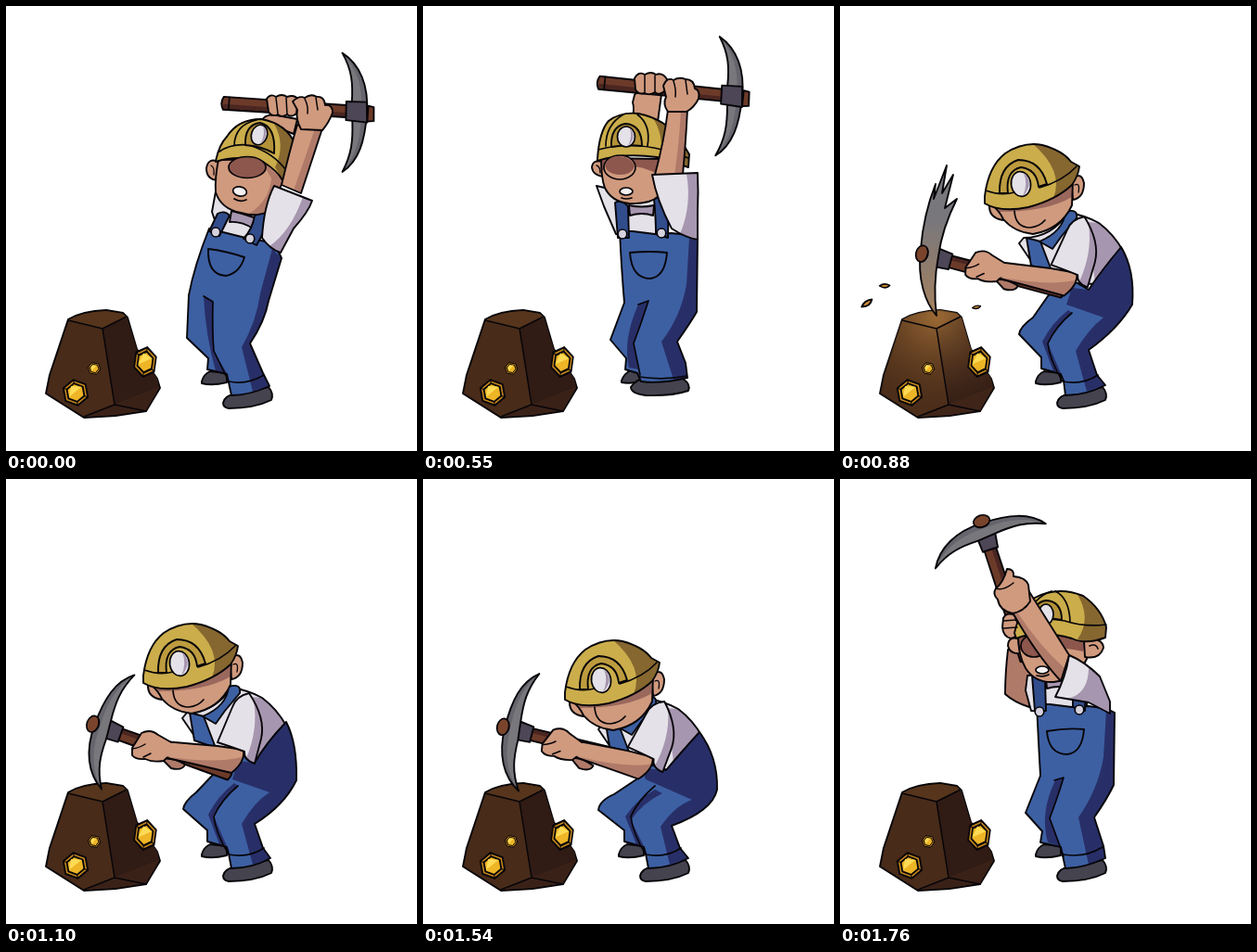
An HTML page for the animation above (1870 ms loop, 443 by 480 pixels).

```html
<!DOCTYPE html>
<html lang="en">
<head>
<meta charset="utf-8">
<title>Miner</title>
<style>
html, body { margin: 0; width: 100%; height: 100%; overflow: hidden; background: #fff; }
svg { display: block; width: 443px; height: 480px; }
</style>
</head>
<body>
<svg viewBox="0 0 443 480" stroke-linejoin="round" stroke-linecap="round">
  <defs>
    <radialGradient id="glow" gradientUnits="userSpaceOnUse" cx="104" cy="335" r="95">
      <stop offset="0" stop-color="#c98c45" stop-opacity=".6"/>
      <stop offset="1" stop-color="#6b4520" stop-opacity=".1"/>
    </radialGradient>
    <linearGradient id="heat" x1="0" y1="0" x2="0" y2="1">
      <stop offset=".35" stop-color="#78777c"/>
      <stop offset="1" stop-color="#a5815f"/>
    </linearGradient>
  </defs>
  <g id="stage"></g>
</svg>
<script>
const INK = '#070509', SKIN = '#d09a7e', SKIN_DARK = '#8d574d', SKIN_MID = '#b07a69',
  HAT = '#cbad4b', HAT_DARK = '#86672f', BLUE = '#3d60a3', NAVY = '#282f68', STRAP = '#324d8c',
  WHITE = '#e4e2e8', LILAC = '#a796b0', BOOT = '#45434e',
  STEEL = '#78777c', STEEL_DARK = '#4c4656', WOOD = '#6c3a29';
const LOOP = 1870;

const fill = (d, c) => `<path d="${d}" fill="${c}"/>`;
const line = (d, w = 1.7) => `<path d="${d}" fill="none" stroke="${INK}" stroke-width="${w}"/>`;
const part = (d, c, shade = '', dark = '') => fill(d, c) + (shade && fill(shade, dark)) + line(d, 1.9);
const oval = (x, y, rx, ry, c, a = 0) =>
  `<ellipse cx="${x}" cy="${y}" rx="${rx}" ry="${ry}" fill="${c}" stroke="${INK}" stroke-width="1.7" transform="rotate(${a} ${x} ${y})"/>`;
const group = (t, s) => `<g transform="${t}">${s}</g>`;

// Blend two poses whose paths share the same commands
const NUM = /-?\d+(\.\d+)?/g;
function mixText(a, b, k) {
  const to = b.match(NUM);
  let i = 0;
  return a.replace(NUM, n => +(n * (1 - k) + to[i++] * k).toFixed(2));
}
const mix = (a, b, k) => Object.fromEntries(Object.keys(a).map(key => [key, mixText(a[key], b[key], k)]));

const heads = {
  tilted: () =>
    part('M229,168 Q218,163 216,175 Q216,187 228,188Z', SKIN) + line('M221,172 Q225,174 224,182', 1.3) +
    part('M229,166 Q225,185 226,201 Q232,219 253,223 Q270,228 281,222 Q292,205 299,188 L290,165Z', SKIN,
      'M275,166 L299,188 Q292,205 281,222 Q272,226 262,224 Q284,210 286,186Z', SKIN_MID) +
    part('M226,167 Q230,149 238,141 Q250,122 275,122 Q303,127 312,150 Q314,163 310,173 L298,188 Q293,178 277,168 Q250,160 226,168Z', HAT,
      'M289,127 Q307,135 312,150 Q314,163 310,173 L298,188 L290,174 Q302,150 289,127Z', HAT_DARK) +
    line('M230,157 Q243,148 262,150 Q290,159 303,179 M246,150 Q247,128 270,123') +
    part('M258,150 Q257,128 274,126 Q291,130 289,159 Q275,151 258,150Z', '#b39238') +
    oval(273, 139, 8.5, 11, WHITE, 20) + fill('M277,129 Q285,138 274,149 Q280,139 277,129Z', LILAC) +
    oval(260, 174, 20, 11.5, SKIN_DARK) +
    oval(252, 200, 7.5, 5, '#f4f1f2', 12) + line('M246,208 Q252,212 259,209'),
  level: () =>
    part('M194,168 Q183,165 182,174 Q183,183 195,184Z', SKIN) + line('M187,172 Q191,173 191,180', 1.3) +
    part('M192,164 Q192,186 196,196 Q203,211 222,213 Q245,214 254,205 L258,165Z', SKIN,
      'M192,165 L258,165 L254,182 Q226,166 193,177Z', SKIN_DARK) +
    part('M188,165 Q190,135 200,124 Q213,114 232,116 Q262,122 278,145 L287,160 L286,174 Q270,168 252,163 Q215,158 188,167Z', HAT,
      'M248,121 Q266,130 278,145 L287,160 L286,174 L256,164 Q260,140 248,121Z', HAT_DARK) +
    line('M189,155 Q222,146 258,155 Q272,158 286,164 M197,151 Q197,128 216,117 M242,151 Q246,128 231,117') +
    part('M203,152 Q202,130 218,127 Q236,128 236,151 Q220,149 203,152Z', '#b39238') +
    oval(219, 141, 9.5, 11, WHITE) + fill('M223,132 Q231,141 221,151 Q226,141 223,132Z', LILAC) +
    oval(212, 174, 17, 13, SKIN) + fill('M196,172 Q200,161 212,162 Q225,163 228,173 Q225,182 212,182 Q198,181 196,172Z', SKIN_DARK) +
    oval(219, 200, 7, 4, '#f4f1f2') + line('M214,207 Q219,209 225,207'),
  raised: () =>
    part('M192,172 Q181,170 181,180 Q183,189 194,188Z', SKIN) +
    part('M192,168 Q192,190 200,204 Q210,220 230,219 Q256,216 266,194 L266,168Z', SKIN,
      'M192,168 L266,168 L262,186 Q225,178 193,184Z', SKIN_DARK) +
    part('M263,174 Q283,170 284,182 Q280,195 264,192Z', SKIN) + line('M269,180 Q276,177 278,183') +
    oval(209, 180, 14, 12, SKIN_DARK) +
    part('M188,166 Q195,136 210,128 Q235,115 262,126 Q282,140 287,160 L286,171 Q265,179 250,172 Q215,162 190,172Z', HAT,
      'M255,123 Q282,137 287,160 L286,171 Q268,178 256,173 Q272,150 255,123Z', HAT_DARK) +
    line('M196,156 Q220,148 242,153 Q264,160 287,157 M204,150 Q206,129 228,121 M248,154 Q247,128 232,121') +
    part('M209,151 Q208,133 222,131 Q239,132 239,152 Q224,149 209,151Z', '#b39238') +
    oval(222, 146, 8, 11, WHITE) +
    oval(218, 206, 7, 4, '#f4f1f2') + line('M212,212 Q219,214 225,211'),
  bent: () =>
    part('M153,221 Q152,236 168,238 L170,222Z', SKIN) +
    part('M241,195 Q252,184 255,198 Q255,214 243,216Z', SKIN) + line('M245,200 Q251,197 249,208', 1.3) +
    part('M156,222 Q164,228 168,237 Q180,251 200,253 Q230,248 242,222 L243,195 Q210,220 156,222Z', SKIN,
      'M160,223 Q205,225 243,198 L242,213 Q215,229 164,229Z', '#9b685d') +
    line('M180,228 Q181,246 197,246 Q207,245 213,238') +
    part('M148,212 Q152,180 170,166 Q190,153 210,157 Q232,163 241,175 L250,180 Q249,190 242,200 Q225,216 195,224 Q165,230 148,220Z', HAT,
      'M199,155 Q232,161 241,175 L250,180 Q249,190 242,200 Q232,208 222,214 Q234,185 199,155Z', HAT_DARK) +
    line('M149,206 Q165,212 180,208 M207,203 Q232,196 247,180') +
    part('M164,209 Q163,180 184,173 Q208,173 215,199 L206,202 Q204,183 187,181 Q170,185 173,209Z', '#bd9b3e') +
    oval(187, 199, 10.5, 13.5, WHITE, -8) + fill('M190,187 Q202,198 189,212 Q195,199 190,187Z', LILAC)
};

const back = {
  head: 'tilted', headAt: 'translate(0 0) rotate(0 260 174)', pick: '380 115 4',
  farArm: 'M276,124 Q278,116 292,118 L314,122 L310,138 L300,134 Q288,126 276,128Z',
  farHand: 'M281,100 Q285,94 291,98 Q297,94 303,98 Q311,95 315,101 L313,116 Q307,121 303,117 Q297,121 293,117 Q286,120 283,114Z',
  hand: 'M309,103 Q316,96 322,99 Q329,94 335,98 Q343,97 344,107 Q352,106 352,115 Q348,126 341,134 L318,133 Q312,122 314,112Z',
  fingers: 'M291,99 L293,116 M302,99 L303,117 M322,100 Q326,108 325,116 M334,99 L336,112',
  arm: 'M314,128 Q306,155 297,193 L318,202 Q330,165 341,132Z',
  armDark: 'M333,132 Q322,165 310,199 L318,202 Q330,165 341,132Z',
  sleeve: 'M289,194 L330,210 Q326,222 310,240 L296,266 Q284,262 276,250 Q278,215 289,194Z',
  sleeveDark: 'M320,206 L330,210 Q326,222 310,240 L296,266 L284,259 Q307,243 320,206Z',
  shirt: 'M226,200 L222,222 L230,246 L285,258 L286,222 L262,214Z',
  collar: 'M243,221 Q256,224 270,229 L266,240 Q254,232 241,233Z',
  pants: 'M219,240 Q203,280 197,312 L195,358 L218,380 L217,392 L238,397 L243,420 Q262,420 284,410 L277,396 L263,364 Q279,340 283,318 L297,272 Q290,256 280,254 L258,250 L234,244Z',
  pantsDark: 'M287,262 L297,272 L283,318 Q279,340 263,364 L277,396 L284,410 L266,416 L254,368 Q270,340 274,310Z M213,313 L223,319 L224,372 L238,396 L226,394 Q215,355 213,313Z',
  seams: 'M213,313 L223,319 Q222,350 224,372 L240,405 M240,405 Q260,409 278,398',
  strapL: 'M228,224 Q236,220 241,226 L230,248 L219,243Z',
  strapR: 'M268,226 Q280,220 281,228 Q281,240 270,258 L256,251 Q266,240 268,226Z',
  buttons: '226 244 263 251',
  pocket: 'M218,262 Q217,290 237,291 Q252,288 257,271 Q236,264 218,262Z',
  boot: 'M234,428 Q236,420 246,419 L283,411 Q289,418 286,425 Q268,434 240,434 Q234,433 234,428Z',
  farBoot: 'M211,405 Q213,397 220,394 L238,396 L238,406 Q222,410 211,407Z'
};
const far = {
  head: 'tilted', headAt: 'translate(9 -11) rotate(4 260 174)', pick: '410 131 21',
  farArm: 'M314,102 Q318,96 326,102 L344,114 L332,128 L324,150 Q310,140 305,126Z',
  farHand: 'M318,88 Q322,80 330,84 Q337,82 342,89 Q349,88 352,95 L345,110 Q338,113 336,108 Q329,110 327,105 Q319,106 318,98Z',
  hand: 'M350,98 Q356,92 361,96 Q368,95 371,102 Q379,102 380,112 Q384,117 378,126 Q372,135 365,139 L343,128 Q340,120 345,112Z',
  fingers: 'M329,85 L327,104 M341,90 L336,107 M361,97 Q360,106 355,114 M371,103 L365,118',
  arm: 'M342,126 Q328,158 317,185 L333,198 Q350,165 365,137Z',
  armDark: 'M357,134 Q342,165 327,193 L333,198 Q350,165 365,137Z',
  sleeve: 'M314,183 L339,218 Q330,230 312,250 L302,262 Q290,255 280,244 Q295,215 314,183Z',
  sleeveDark: 'M333,209 L339,218 Q330,230 312,250 L302,262 L288,252 Q317,238 333,209Z',
  shirt: 'M243,198 L240,212 L240,236 L285,248 L300,222 L270,205Z',
  collar: 'M247,210 Q260,210 272,214 L268,226 Q256,221 246,222Z',
  pants: 'M226,240 Q212,280 205,310 L202,350 L221,381 L221,393 L232,395 L239,405 Q258,407 279,400 L282,386 L274,352 Q282,330 285,310 L303,263 Q298,256 286,248 L266,244 L240,236Z',
  pantsDark: 'M295,256 L303,263 L285,310 Q282,330 274,352 L282,386 L279,400 L270,403 L266,355 Q276,330 281,300Z M219,310 L230,314 L230,372 L234,395 L230,392 Q224,355 219,310Z',
  seams: 'M219,310 L230,314 Q227,340 230,372 L239,403 M239,402 Q260,405 280,399',
  strapL: 'M236,207 Q243,204 248,212 L240,238 L228,233Z',
  strapR: 'M280,214 Q292,210 292,218 Q288,232 278,248 L264,241 Q272,230 280,214Z',
  buttons: '233 230 269 240',
  pocket: 'M221,259 Q216,285 237,287 Q250,285 260,267 Q240,260 221,259Z',
  boot: 'M232,413 Q236,406 246,404 L278,402 Q288,410 286,418 Q268,427 245,426 Q232,422 232,413Z',
  farBoot: 'M211,405 Q215,397 222,393 L237,396 L239,406 Q222,409 211,407Z'
};
const ready = {
  head: 'level', headAt: 'translate(0 0)', pick: '335 98 6',
  farArm: 'M228,96 Q230,92 240,93 L257,95 L253,125 L226,122 Q228,110 226,104Z',
  farHand: 'M228,78 Q232,70 239,74 Q246,70 251,74 Q258,71 263,79 L260,92 Q255,97 250,93 Q244,97 239,94 Q232,96 229,90Z',
  hand: 'M259,86 Q263,76 270,80 Q276,76 283,79 Q292,79 293,89 Q299,91 297,100 Q292,110 284,114 L264,114 Q258,106 262,98Z',
  fingers: 'M239,75 L239,93 M250,75 L250,93 M270,81 Q273,90 272,98 M283,80 L285,95',
  arm: 'M264,112 Q260,145 250,182 L280,182 Q283,150 285,112Z',
  armDark: 'M278,112 Q276,150 271,182 L280,182 Q283,150 285,112Z',
  sleeve: 'M247,182 L296,180 Q297,200 296,222 L296,252 Q283,250 268,240 Q252,210 247,182Z',
  sleeveDark: 'M284,181 L296,180 Q297,200 296,222 L296,252 L277,246 Q290,215 284,181Z',
  shirt: 'M187,194 L195,216 L208,246 L262,250 L262,212 L235,205Z',
  collar: 'M222,215 Q236,218 249,215 L248,226 Q236,222 223,226Z',
  pants: 'M212,243 Q214,285 217,320 L202,360 L219,380 L218,392 L231,396 L235,405 Q255,408 285,401 L283,385 L274,362 Q288,342 295,330 L296,250 Q288,247 268,245 L250,246 L226,243Z',
  pantsDark: 'M287,250 L296,250 L295,330 Q288,342 274,362 L283,385 L285,401 L270,403 L257,362 Q278,335 284,300Z M232,322 L243,318 L227,364 L232,392 L222,390 Q215,360 232,322Z',
  seams: 'M232,322 L243,318 Q236,340 227,364 L234,398 M233,400 Q260,404 284,399',
  strapL: 'M207,212 Q214,208 221,216 L222,250 L210,250Z',
  strapR: 'M249,208 Q261,204 263,212 Q265,228 264,250 L251,246 Q251,230 249,208Z',
  buttons: '215 246 257 245',
  pocket: 'M223,266 Q225,294 245,294 Q261,292 263,266 Q245,264 223,266Z',
  boot: 'M224,411 Q230,402 240,402 L280,402 Q289,408 286,415 Q268,421 240,420 Q224,418 224,411Z',
  farBoot: 'M214,404 Q217,396 224,393 L236,396 L236,405 Q222,408 214,406Z'
};
const lift = {
  ...ready, head: 'raised', pick: '156 56 252', forward: 'yes',
  farArm: 'M181,184 Q178,210 178,232 Q188,241 204,246 L206,205 L195,185Z',
  farHand: 'M176,150 Q180,143 188,147 L193,160 Q191,172 184,172 Q176,170 175,160Z',
  hand: 'M168,118 Q176,112 180,97 Q188,97 187,105 Q200,106 203,114 L205,132 Q198,143 186,145 Q172,142 170,130 Q164,124 168,118Z',
  fingers: 'M168,118 Q176,121 187,112 M176,153 L190,152 M176,161 L191,160',
  arm: 'M203,120 Q222,150 247,190 L238,218 Q212,190 186,144Z',
  armDark: 'M192,145 Q215,180 242,204 L238,218 Q212,190 186,144Z',
  sleeve: 'M247,190 Q264,197 280,213 L291,240 L291,253 L268,241 L232,235 Q243,215 247,190Z',
  sleeveDark: 'M268,203 Q276,207 280,213 L291,240 L291,253 L268,241 L245,237 Q268,232 268,203Z',
  shirt: 'M202,212 L200,228 L206,250 L266,252 L266,212 L235,210Z',
  pants: 'M212,243 Q214,285 216,320 L200,360 L218,380 L216,392 L238,397 L243,420 Q262,420 286,409 L284,396 L274,365 Q288,345 295,330 L296,252 Q288,247 268,245 L250,246 L226,243Z',
  pantsDark: 'M287,250 L296,252 L295,330 Q288,345 274,365 L284,396 L286,409 L268,416 L257,365 Q278,335 284,300Z M232,325 L241,322 L226,366 L238,396 L224,392 Q215,360 232,325Z',
  seams: 'M231,325 L241,322 Q235,342 226,366 L241,407 M241,405 Q264,409 283,397',
  buttons: '215 251 258 249',
  pocket: 'M223,272 Q225,297 245,297 Q261,295 263,270 Q245,268 223,272Z',
  boot: back.boot, farBoot: back.farBoot
};

const rest = {
  headAt: 'translate(0 0)', torsoAt: 'translate(0 0)', armAt: 'translate(0 0) rotate(0 256 300)', pick: '104 268 200',
  pants: 'M302,262 Q314,285 313,325 Q300,352 268,372 L277,398 L285,409 Q265,420 243,420 L240,404 L238,397 L217,391 L217,379 L191,356 Q192,348 205,338 L224,318 L236,306 L254,298 L268,306 Q280,285 302,262Z',
  dark: 'M302,262 Q314,285 313,325 Q300,352 268,372 L277,398 L285,409 L266,416 L254,372 Q268,348 284,338 L244,324 L250,304 L268,306 Q280,285 302,262Z M246,328 Q228,342 218,362 L230,394 L238,396 L224,364 Q234,345 250,331Z'
};
const strike = {
  headAt: 'translate(8 -7)', torsoAt: 'translate(3 -2)', armAt: 'translate(-1 -4) rotate(2 256 300)', pick: '99 270 195',
  pants: 'M303,260 Q318,285 315,322 Q300,348 268,371 L277,398 L286,409 Q265,420 243,420 L241,404 L238,397 L217,391 L217,379 L193,354 Q194,346 208,336 L224,313 L236,302 L254,298 L268,306 Q282,285 303,260Z',
  dark: 'M303,260 Q318,285 315,322 Q300,348 268,371 L277,398 L286,409 L266,416 L254,372 Q268,348 284,336 L244,322 L250,304 L268,306 Q282,285 303,260Z M246,328 Q228,342 218,362 L230,394 L238,396 L224,364 Q234,345 250,331Z'
};
const slump = {
  headAt: 'translate(5 18)', torsoAt: 'translate(-1 12)', armAt: 'translate(-9 8) rotate(6 256 300)', pick: '97 270 194',
  pants: 'M298,273 Q318,300 317,335 Q312,358 268,374 L277,398 L286,409 Q265,420 243,420 L240,404 L238,397 L217,391 L217,379 L189,357 Q190,347 206,340 L230,324 L236,314 L240,306 L262,314 Q278,295 298,273Z',
  dark: 'M298,273 Q318,300 317,335 Q312,358 268,374 L277,398 L286,409 L266,416 L256,375 Q272,352 290,346 L240,324 L236,312 L262,314 Q278,295 298,273Z M250,335 Q230,346 218,364 L230,394 L238,396 L224,368 Q236,350 258,339Z'
};

const BLADE = 'M-22,-63 C-2,-52 9,-30 9,0 C9,30 4,52 -13,65 C-4,45 -4,30 -6,10 L-8,-10 C-8,-30 -10,-45 -22,-63Z';
const EDGE = 'M-22,-63 C-2,-52 9,-30 9,0 C9,30 4,52 -13,65 C2,45 4,25 3,0 C3,-30 -6,-48 -22,-63Z';
const SMEAR = 'M104,334 C92,320 83,295 87,262 Q90,225 103,192 L101,208 L115,172 L110,202 L122,182 L113,218 L126,208 Q110,240 106,270 Q100,302 104,334Z';

function pick(spec, forward, smear) {
  const [x, y, a] = spec.split(' ');
  const at = `translate(${x} ${y}) rotate(${a})`;
  const handle = part('M-146,-7 L-10,-7 L-10,6 L-146,7 Q-150,0 -146,-7Z', WOOD, 'M-146,1 L-10,1 L-10,6 L-146,7Z', '#4b2621');
  const blade = part(BLADE, STEEL, EDGE, '#66646c');
  if (!forward) return group(at, handle + line('M-140,-7 L-140,7') + blade +
    part('M-14,-11 L8,-12 L10,10 L-13,9Z', STEEL_DARK) + part('M10,-8 L16,-7 L17,8 L10,9Z', WOOD));
  return group(at, handle + part('M-21,-9 L-6,-10 L-6,10 L-21,8Z', STEEL_DARK) + (smear ? '' : blade)) +
    (smear ? part(SMEAR, 'url(#heat)') : '') + group(at, oval(11, 0, 6.5, 9, '#7a442c') + line('M7,-7 Q3,0 7,7', 1.2));
}

function standing(p) {
  const b = p.buttons.split(' ');
  return part(p.farArm, p.forward ? SKIN_MID : SKIN) + pick(p.pick, p.forward) +
    part(p.farHand, SKIN) + part(p.farBoot, BOOT) + part(p.boot, BOOT) +
    part(p.shirt, WHITE) + part(p.collar, LILAC) + part(p.pants, BLUE, p.pantsDark, NAVY) + line(p.seams) +
    part(p.strapL, STRAP) + part(p.strapR, STRAP) +
    oval(b[0], b[1], 4.8, 5, '#d6d2de') + oval(b[2], b[3], 4.8, 5, '#d6d2de') + part(p.pocket, BLUE) +
    group(p.headAt, heads[p.head]()) +
    part(p.arm, SKIN, p.armDark, SKIN_MID) + part(p.sleeve, WHITE, p.sleeveDark, LILAC) +
    part(p.hand, SKIN) + line(p.fingers, 1.5);
}

function crouching(p, smear) {
  const torso =
    part('M243,225 Q262,228 276,236 Q292,248 302,266 L272,302 L235,300 L205,280 L190,258 L195,252 Q225,252 243,225Z', WHITE,
      'M276,236 Q292,248 302,266 L272,302 L264,235Z', LILAC) +
    part('M198,252 L213,256 L226,290 L203,282Z', BLUE) +
    part('M240,224 Q254,220 252,231 L236,250 L226,264 L212,256 Q238,245 240,224Z', BLUE);
  const arm =
    part('M168,302 Q180,300 193,308 Q190,315 178,312Z', SKIN_MID) +
    part('M170,283 L228,288 L256,292 Q258,305 243,317 L205,308 L170,300Z', SKIN,
      'M178,300 Q225,307 254,300 Q252,310 243,317 L205,308Z', SKIN_MID) +
    part('M136,290 Q140,284 146,274 Q156,269 164,276 L178,284 Q180,296 170,304 Q158,306 150,302 Q140,303 136,298Z', SKIN) +
    fill('M168,284 L180,285 L180,299 L168,300Z', SKIN) + line('M136,291 Q144,290 150,286 M148,300 L156,296', 1.5) +
    part('M262,231 Q248,234 244,246 L228,284 Q246,290 257,294 Q256,303 268,307 L275,280 Q280,258 262,231Z', WHITE,
      'M267,240 Q278,260 275,280 L268,307 L259,301 Q272,270 267,240Z', LILAC);
  return part(back.farBoot, BOOT) + part(back.boot, BOOT) + group(p.torsoAt, torso) +
    part(p.pants, BLUE, p.dark, NAVY) + line('M250,331 Q232,346 224,364 Q226,382 240,405 Q262,409 278,398') +
    pick(p.pick, true, smear) + group(p.headAt, heads.bent()) + group(p.armAt, arm);
}

function gem(x, y, s, a) {
  const ring = r => 'M' + [0, 1, 2, 3, 4, 5].map(i =>
    `${(r * Math.cos(i * Math.PI / 3)).toFixed(1)},${(r * Math.sin(i * Math.PI / 3)).toFixed(1)}`).join(' L') + 'Z';
  return group(`translate(${x} ${y}) rotate(${a}) scale(${s})`,
    part(ring(14), '#c98a1c') + part(ring(10), '#eeb526') +
    fill('M-7,-5 L4,-8 L-5,7Z', '#ffdb55') + line('M10,0 L14,0 M-10,0 L-14,0 M5,9 L7,12 M-5,-9 L-7,-12', 1.1));
}

const BODY = 'M67,338 Q82,329 108,328 L126,331 L131,336 L141,370 L163,402 L166,412 L151,437 L118,442 L84,444 L43,418 L47,398Z';
const rock = lit =>
  part(BODY, '#482b19') +
  fill('M67,339 Q82,330 108,329 L126,332 L129,335 L104,348Z', '#56351c') +
  fill('M104,348 L130,335 L141,370 L163,402 L165,411 L117,430Z', '#301b15') +
  fill('M117,430 L165,411 L151,436 L118,441 L85,443Z', '#3a2117') +
  (lit ? fill(BODY, 'url(#glow)') : '') +
  line('M67,339 L104,348 L130,335 M104,348 L117,430 L84,443 M117,430 L151,437', 1.5) +
  gem(75, 417, 1, 20) + gem(95, 391, .48, 10) +
  group('translate(150 384) scale(.9 1.15)', gem(0, 0, 1, 40));

// Chips fly outward from the pick's tip
const chip = (x, y, s, a) => group(`translate(${x} ${y}) rotate(${a}) scale(${s})`,
  part('M-6,2 Q-2,-4 6,-3 Q3,4 -6,2Z', '#c98a35'));
const chips = k => [[29, 321, 1.05, -14], [48, 302, .85, 20], [147, 325, .7, 10]]
  .map(([x, y, s, a]) => chip(104 + (x - 104) * k, 330 + (y - 330) * k + 8 * (k - 1), s, a)).join('');

const settle = k => () => rock() + crouching(mix(rest, slump, k));
const upright = p => () => rock() + standing(p);
const heave = { ...slump, armAt: 'translate(-4 -16) rotate(36 256 300)', headAt: 'translate(6 4)', torsoAt: 'translate(0 5)', pick: '128 176 234' };

const plan = [
  [0, upright(back)],
  [220, upright(mix(back, far, .55))],
  [330, upright(far)],
  [550, upright(ready)],
  [660, upright(lift)],
  [770, () => rock(true) + crouching(strike, true) + chips(.6)],
  [880, () => rock(true) + crouching(strike, true) + chips(1)],
  [990, () => rock() + crouching(mix(strike, rest, .6)) + chips(1.09)],
  [1100, settle(0)],
  [1210, settle(.2)],
  [1320, settle(.45)],
  [1430, settle(.75)],
  [1540, settle(1)],
  [1650, () => rock() + crouching(heave)],
  [1760, upright(lift)]
];

const stage = document.getElementById('stage');
const start = performance.now();
let shown = -1;
function tick() {
  const t = (performance.now() - start) % LOOP;
  const i = plan.filter(([from]) => from <= t).length - 1;
  if (i !== shown) stage.innerHTML = plan[shown = i][1]();
  requestAnimationFrame(tick);
}
tick();
</script>
</body>
</html>
```
